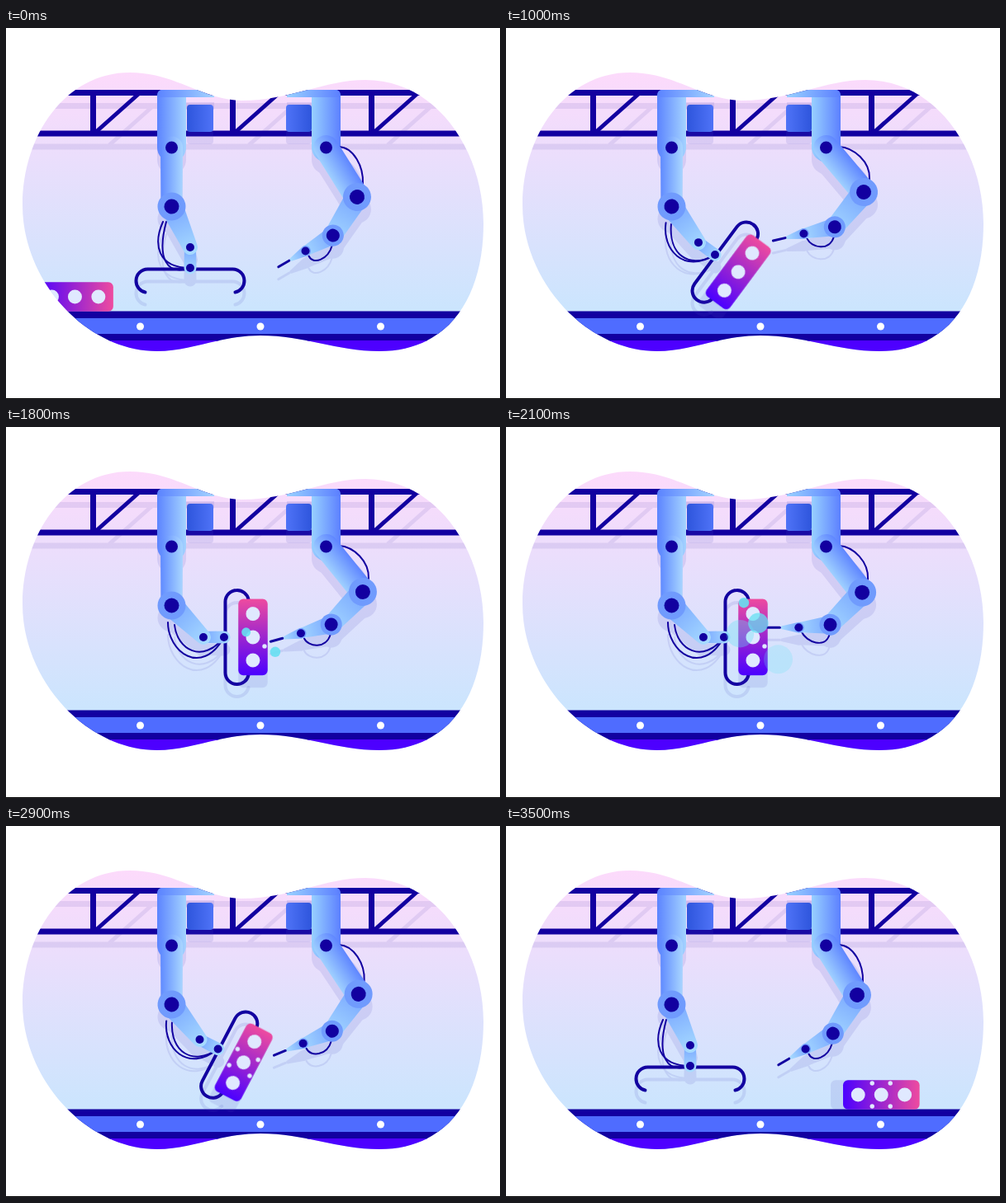
These frames come from a looping animation (598 by 450 pixels, 3.6 s). An HTML page:

```html
<!DOCTYPE html>
<html lang="en">
<head>
<meta charset="utf-8">
<title>Robot arms on a conveyor</title>
<style>
html, body { margin: 0; width: 100%; height: 100%; overflow: hidden; background: #fff; }
svg { display: block; }
.shade { filter: drop-shadow(0 15px 0 rgba(80, 80, 190, .13)); }
#truss { filter: drop-shadow(16px 16px 0 rgba(90, 70, 180, .12)); }
#box { filter: drop-shadow(-15px 0 0 rgba(80, 80, 190, .13)); }
.ink { fill: #1200a0; }
.line { fill: none; stroke: #1200a0; stroke-width: 2; stroke-linecap: round; }
.joint { fill: #709bfd; }
.beam { fill: none; stroke: #1200a0; stroke-width: 7; }
</style>
</head>
<body>
<svg width="598" height="450" viewBox="0 0 598 450">
<defs>
  <clipPath id="blob"><path d="M20 215C20 130 72 54 150 54C205 54 240 88 285 88C345 88 385 63 435 63C522 63 578 150 578 237C578 328 535 392 452 392C400 392 362 373 308 373C260 373 225 392 183 392C98 392 20 308 20 215Z"/></clipPath>
  <linearGradient id="sky" x2="0" y2="1"><stop stop-color="#fddafb"/><stop offset="1" stop-color="#c2e7fe"/></linearGradient>
  <linearGradient id="right"><stop stop-color="#5c84ff"/><stop offset="1" stop-color="#a4d3ff"/></linearGradient>
  <linearGradient id="left"><stop stop-color="#98d0ff"/><stop offset="1" stop-color="#5c80ff"/></linearGradient>
  <linearGradient id="across" x2="0" y2="1"><stop stop-color="#a9d6ff"/><stop offset="1" stop-color="#5f8aff"/></linearGradient>
  <linearGradient id="back" x2="0" y2="1"><stop stop-color="#5f86ff"/><stop offset="1" stop-color="#9fd0ff"/></linearGradient>
  <linearGradient id="along"><stop stop-color="#6f9bff"/><stop offset="1" stop-color="#a8dcff"/></linearGradient>
  <linearGradient id="motorL"><stop stop-color="#2e55dc"/><stop offset="1" stop-color="#4f73f7"/></linearGradient>
  <linearGradient id="motorR"><stop stop-color="#4f73f7"/><stop offset="1" stop-color="#2e55dc"/></linearGradient>
  <linearGradient id="pink"><stop stop-color="#4b00ff"/><stop offset="1" stop-color="#ee4b9f"/></linearGradient>
</defs>
<g clip-path="url(#blob)">
  <rect y="50" width="598" height="345" fill="url(#sky)"/>
  <g id="truss" class="beam">
    <path d="M0 78.5H598M0 128H598"/>
    <path stroke-width="5" style="stroke-width:5" d="M109 126L160.5 80M278 126L329.5 80M446 126L497.5 80"/>
  </g>
  <path class="beam" d="M105.5 80V127M274.5 80V127M442.5 80V127"/>
  <path class="ink" d="M0 343.5H598V380H0Z"/>
  <path fill="#4f6cff" d="M0 352H598V371H0Z"/>
  <path fill="#4d00ff" d="M0 379H598V400H0Z"/>
  <g fill="#fff"><circle cx="162.5" cy="362" r="4.5"/><circle cx="308" cy="362" r="4.5"/><circle cx="453.5" cy="362" r="4.5"/></g>

  <g class="shade">
    <rect x="219" y="93" width="32" height="33" rx="4" fill="url(#motorL)"/>
    <path fill="url(#right)" d="M183 81a6 6 0 0 1 6-6H218V145a17.5 17.5 0 0 1-35 0Z"/>
    <path fill="url(#right)" d="M184 80a5 5 0 0 1 5-5H252V84H184Z"/>
    <path id="wireA" class="line"/><path id="wireB" class="line"/>
    <g id="upperL"></g>
    <circle class="ink" cx="200.5" cy="145" r="7.5"/>
    <path id="grip" class="line" style="stroke-width:4"/>
    <g id="handL"></g>
    <g id="foreL"></g>
    <circle id="wristL" class="ink" r="5"/>
    <circle id="palm" class="ink" r="5"/>
  </g>

  <g id="box">
    <rect x="-46.2" y="-17.8" width="92.6" height="35.6" rx="6" fill="url(#pink)"/>
    <g fill="#e0e9ff">
      <circle cx="-28" r="8.5"/><circle r="8.5"/><circle cx="28.4" r="8.5"/>
      <g id="holes"></g>
    </g>
  </g>

  <g class="shade">
    <rect x="339" y="93" width="31" height="33" rx="4" fill="url(#motorR)"/>
    <path fill="url(#left)" d="M370 75H399a6 6 0 0 1 6 6V145a17.5 17.5 0 0 1-35 0Z"/>
    <path fill="url(#left)" d="M340 75H399a5 5 0 0 1 5 5V84H340Z"/>
    <path id="wireC" class="line"/><path id="wireD" class="line"/>
    <g id="upperR"></g>
    <circle class="ink" cx="387.5" cy="145" r="7.5"/>
    <g id="foreR"></g>
    <g id="handR"></g>
    <g id="tool"></g>
    <circle id="wristR" class="ink" r="5"/>
  </g>
  <g id="bubbles" fill="#66e0f2"></g>
</g>
<path d="M0 449H598V450H0Z"/>
</svg>
<script>
const $ = id => document.getElementById(id);
const clamp = p => Math.min(1, Math.max(0, p));
const span = (t, a, b) => clamp((t - a) / (b - a));
const smooth = p => p * p * (3 - 2 * p);
const cubic = p => p < .5 ? 4 * p ** 3 : 1 - 4 * (1 - p) ** 3;
const lerp = (a, b, p) => a + (b - a) * p;
const reach = ([x, y], len, deg) =>
  [x + len * Math.cos(deg * Math.PI / 180), y + len * Math.sin(deg * Math.PI / 180)];
const shift = ([x, y], dx, dy) => [x + dx, y + dy];
const place = (id, [x, y], deg = 0) =>
  $(id).setAttribute('transform', `translate(${x} ${y}) rotate(${deg})`);
const curve = (id, [a, b, c, d]) => $(id).setAttribute('d', `M${a}C${b} ${c} ${d}`);

// A tapered limb lying along x, with optional round joint and pin at its start
function limb(id, len, r1, r2, fill, joint = 0, pin = 0) {
  $(id).innerHTML = `<path fill="url(#${fill})" d="M0 ${-r1}L${len} ${-r2}A${r2} ${r2} 0 0 1 ${len} ${r2}L0 ${r1}A${r1} ${r1} 0 0 1 0 ${-r1}Z"/>
    <circle class="joint" r="${joint}"/><circle class="ink" r="${pin}"/>`;
}
limb('upperL', 71.5, 13.5, 13, 'across');
limb('foreL', 54.4, 14, 9, 'along', 17, 9);
limb('handL', 25, 7, 7.5, 'along');
limb('upperR', 70.7, 15, 15, 'back');
limb('foreR', 55, 14, 11, 'along', 17, 9);
limb('handR', 38.3, 11, 6, 'along', 13, 8);
limb('tool', 20, 6.5, 2, 'along');
$('tool').innerHTML += '<path class="line" style="stroke-width:3" d="M23 0H38"/>';

const holes = [[-11, 14, 1750], [11, 14, 2150], [11, -14, 2300], [-11, -14, 2450]];
$('holes').innerHTML = holes.map(([x, y]) => `<circle cx="${x}" cy="${y}" r="2.7"/>`).join('');

// dx, dy, age at 2100 ms
const bubbles = [[-35, -40, .15], [-10, -6, .55], [-32, 8, .85], [16, 40, .9]];
$('bubbles').innerHTML = bubbles.map(() => '<circle/>').join('');

// time, shoulder, elbow, wrist and tool angles, easing towards this pose
const easeIn = p => p ** 2, easeOut = p => 1 - (1 - p) ** 2;
const poses = [
  [600, 58, 122, 150.4, 149.5, smooth],
  [1000, 49.9, 129.8, 167.8, 167, easeIn],
  [1300, 50.1, 135, 171, 180, easeOut],
  [1500, 50.1, 135, 171, 180, smooth],
  [1750, 51, 134, 163, 164, smooth],
  [2100, 51.9, 134.6, 174.8, 180, smooth],
  [2300, 57, 141, 176, 178, smooth],
  [2550, 51.9, 134.6, 174.8, 180, smooth],
  [3080, 58, 122, 150.4, 149.5, smooth]
];
function poseAt(t) {
  let i = 1;
  while (i < poses.length - 1 && t > poses[i][0]) i++;
  const a = poses[i - 1], b = poses[i], p = b[5](span(t, a[0], b[0]));
  return [1, 2, 3, 4].map(k => lerp(a[k], b[k], p));
}

function drawLeft(t) {
  const u = cubic(span(t, 680, 1280)) - cubic(span(t, 2645, 3245));
  const foreDeg = lerp(65.6, 45, u), handDeg = lerp(90, 0, u);
  const elbow = [200.5, 216.5], wrist = reach(elbow, 54.4, foreDeg), palm = reach(wrist, 25, handDeg);
  place('upperL', [200.5, 145], 90);
  place('foreL', elbow, foreDeg);
  place('handL', wrist, handDeg);
  place('wristL', wrist);
  place('palm', palm);
  const mix = (x1, y1, x2, y2) => [lerp(x1, x2, u), lerp(y1, y2, u)];
  curve('wireA', [mix(190, 235, 196, 237), mix(178, 262, 196, 272), mix(183, 291, 236, 304), palm]);
  curve('wireB', [mix(194, 235, 204, 240), mix(182, 280, 207, 270), mix(195, 301, 238, 288), palm]);

  const c = 65.5 - 8.5 * (smooth(span(t, 350, 600)) - smooth(span(t, 3230, 3450)));
  $('grip').setAttribute('d', `M${11 - c} 28A14 14 0 0 1 ${-c} 14A14 14 0 0 1 ${14 - c} 0H${c - 14}A14 14 0 0 1 ${c} 14A14 14 0 0 1 ${c - 11} 28`);
  place('grip', shift(palm, 1.5 * u, 1.5 * (1 - u)), handDeg - 90);

  const n = t / 100;
  const dx = 37 * Math.max(0, n - 32.5) ** 2 - 25.7 * Math.max(0, 2.33 - n) ** 2;
  place('box', shift(reach(palm, 35, handDeg), dx, 0), handDeg - 90);
  holes.forEach((h, i) => $('holes').children[i].setAttribute('opacity', +(t >= h[2])));
}

function drawRight(t) {
  const [a, b, c, d] = poseAt(t);
  const shoulder = [387.5, 145], elbow = reach(shoulder, 70.7, a);
  const joint = reach(elbow, 55, b), wrist = reach(joint, 38.3, c);
  place('upperR', shoulder, a);
  place('foreR', elbow, b);
  place('handR', joint, c);
  place('tool', wrist, d);
  place('wristR', wrist);
  curve('wireC', [[403, 144], [421, 145], shift(elbow, 8, -37), shift(elbow, 7, -16)]);
  curve('wireD', [shift(wrist, 4, 6), shift(wrist, 9, 17), shift(joint, -6, 30), shift(joint, -1, 12)]);
}

function drawBubbles(t) {
  bubbles.forEach(([dx, dy, start], i) => {
    const cycle = (t - 2100) / 400 + start, age = cycle - Math.floor(cycle);
    const birth = t - age * 400, k = .7 + .3 * age, dot = $('bubbles').children[i];
    const looks = {
      cx: 314 + dx * k,
      cy: 243 + dy * k,
      r: 4 + 15 * age,
      opacity: birth > 1650 && birth < 2350 ? .9 * (1 - age ** 3) : 0
    };
    for (const key in looks) dot.setAttribute(key, looks[key]);
  });
}

function frame() {
  const t = Math.floor(performance.now() % 3600 / 100) * 100;
  drawLeft(t);
  drawRight(t);
  drawBubbles(t);
  requestAnimationFrame(frame);
}
frame();
</script>
</body>
</html>
```
